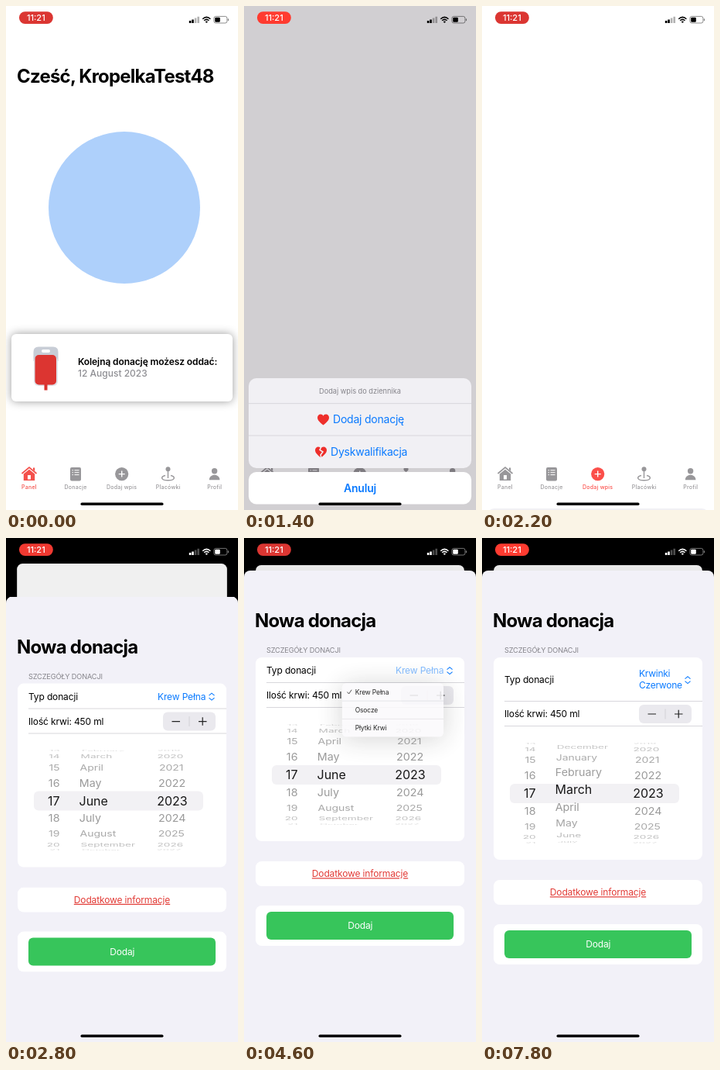
Animation, 300 px wide and 650 px high, one loop 8 s. Source, as an HTML page:

```html
<!DOCTYPE html>
<html lang="pl">
<head>
<meta charset="utf-8">
<title>Nowa donacja</title>
<style>
  html, body { margin: 0; width: 100%; height: 100%; overflow: hidden; background: #000; }
  svg { display: block; width: 100%; height: 100%; font: 12px Inter, "Open Sans", sans-serif; }
  .title { font-size: 24px; font-weight: 700; letter-spacing: -.8px; }
  .body { letter-spacing: -.14px; }
  .mid { text-anchor: middle; }
  .blue { fill: #0a7aff; }
  .action { font-size: 14px; letter-spacing: -.22px; }
  .caption { font-size: 9.2px; fill: #86858b; }
  .line { stroke: #d4d3d8; stroke-width: .9; }
  .tab { color: #98979a; fill: currentColor; }
  .tab text { font-size: 7px; font-weight: 500; letter-spacing: .25px; text-anchor: middle; }

  .pill, .bar, .home, .corners, .app, .shade, .sheet, .dim, .modal, .menu, .menu-box, .third, .last,
  .late, .group, .first-row, .one-line, .two-line, .panel-tab, .plus-tab {
    animation: 8s linear infinite;
  }
  .home, .corners, .panel-tab, .plus-tab, .bar, .late, .first-row, .group, .one-line, .two-line {
    animation-timing-function: step-end;
  }
  .pill { animation: pulse 2.2s ease-in-out infinite; }
  .home { animation-name: home; }
  .corners { animation-name: corners; }
  .panel-tab { animation-name: panel-tab; }
  .plus-tab { animation-name: plus-tab; }
  .bar { animation-name: bar; }
  .dim { animation-name: dim; }
  .sheet { animation-name: sheet; }
  .app { animation-name: app; }
  .shade { animation-name: shade; }
  .modal { animation-name: modal; }
  .menu { animation-name: menu; }
  .menu-box { animation-name: menu-box; }
  .third { animation-name: third; }
  .last { animation-name: last; }
  .late { animation-name: late; }
  .first-row { animation-name: first-row; }
  .group { animation-name: group; }
  .one-line { animation-name: one-line; }
  .two-line { animation-name: two-line; }

  @keyframes pulse { 0%, 10%, 84%, 100% { fill: #db3632; } 42%, 66% { fill: #ff3b30; } }
  @keyframes home { 0% { opacity: 1; } 17.5%, 100% { opacity: 0; } }
  @keyframes corners { 0% { opacity: 1; } 32.5%, 100% { opacity: 0; } }
  @keyframes panel-tab { 0% { color: #f4504b; } 17.5%, 100% { color: #98979a; } }
  @keyframes plus-tab { 0% { color: #98979a; } 25%, 100% { color: #fb4f4a; } }
  @keyframes bar { 0% { color: #000; } 35%, 100% { color: #fff; } }
  @keyframes dim {
    0%, 17.49% { opacity: 0; }
    17.5%, 22.5% { opacity: 1; }
    25% { opacity: .4; }
    27.5%, 100% { opacity: 0; }
  }
  @keyframes sheet {
    0%, 17.49% { transform: translateY(180px); }
    17.5%, 22.5% { transform: none; }
    25% { transform: translateY(96px); }
    27.5% { transform: translateY(168px); }
    30%, 100% { transform: translateY(180px); }
  }
  @keyframes app {
    0%, 30% { transform: none; animation-timing-function: cubic-bezier(.3, .7, .2, 1); }
    39%, 100% { transform: translate(15px, 35px) scale(.9); }
  }
  @keyframes shade { 0%, 30% { opacity: 0; } 37.5%, 100% { opacity: .09; } }
  @keyframes modal {
    0%, 30% { transform: translateY(612px); animation-timing-function: cubic-bezier(.3, .7, .2, 1); }
    39%, 100% { transform: none; }
  }
  @keyframes menu {
    0%, 55% { transform: scale(.2); opacity: 0; }
    57.5% { transform: scale(.7); opacity: .86; }
    60% { transform: scale(.97); opacity: 1; }
    62.5%, 75% { transform: none; opacity: 1; }
    77.5% { transform: translateY(4px) scale(.37); opacity: .13; }
    80%, 100% { transform: scale(.2); opacity: 0; }
  }
  @keyframes menu-box { 0%, 57.5% { height: 99px; } 60%, 75% { height: 132px; } 77.5%, 100% { height: 60px; } }
  @keyframes third { 0%, 75% { opacity: 1; } 77.5%, 100% { opacity: 0; } }
  @keyframes last { 0%, 57.5% { opacity: 0; } 60%, 75% { opacity: 1; } 77.5%, 100% { opacity: 0; } }
  @keyframes late { 0% { transform: none; } 77.5%, 100% { transform: translateY(24px); } }
  @keyframes first-row { 0% { transform: none; } 77.5%, 100% { transform: translateY(12px); } }
  @keyframes group { 0% { height: 237px; } 77.5%, 100% { height: 261px; } }
  @keyframes one-line { 0% { opacity: 1; } 57.5% { opacity: .5; } 77.5%, 100% { opacity: 0; } }
  @keyframes two-line { 0% { opacity: 0; } 77.5%, 100% { opacity: 1; } }
</style>
</head>
<body>
<svg viewBox="0 0 300 650">
  <defs>
    <path id="heart" d="M7.5 14C3 10.5 0 7.8 0 4.3C0 1.6 2 0 4 0C5.6 0 6.9.9 7.5 2.2C8.1.9 9.4 0 11 0C13 0 15 1.6 15 4.3C15 7.8 12 10.5 7.5 14Z" fill="#ee2f2b"/>
  </defs>
  <rect width="300" height="650"/>

  <g class="app">
    <rect width="300" height="660" rx="8" fill="#fff"/>
    <rect class="corners" width="300" height="20" fill="#fff"/>
    <g class="home">
      <text x="14" y="99" class="title">Cześć, KropelkaTest48</text>
      <circle cx="153" cy="260" r="98" fill="#aed0fb"/>
      <rect x="7" y="423" width="286" height="87" rx="6" fill="#fff" style="filter: drop-shadow(0 0 6px #0006)"/>
      <path d="M35.5 458V446Q35.5 439.5 42 439.5H61Q67.5 439.5 67.5 446V458Z" fill="#c8cdd6"/>
      <rect x="46" y="443" width="11" height="4" rx="2" fill="#fff"/>
      <rect x="36" y="452" width="31" height="38" rx="6" fill="#dfe2e8"/>
      <rect x="49.5" y="486" width="4" height="9.5" fill="#d8332f"/>
      <rect x="37.5" y="450" width="27.5" height="38.5" rx="5" fill="#dc3531"/>
      <text x="93" y="463" font-weight="600" letter-spacing="-.1">Kolejną donację możesz oddać:</text>
      <text x="93" y="478" font-weight="500" fill="#8e8e93">12 August 2023</text>
    </g>

    <g class="tab panel-tab">
      <path d="M20.5 603L30 595.2L39.5 603" fill="none" stroke="currentColor" stroke-width="1.7"/>
      <path d="M22.8 603.5L30 597.8L37.2 603.5V612H22.8ZM35 595.5h2.2v4.5l-2.2-2Z"/>
      <rect x="28" y="605" width="4" height="5.5" fill="#fff"/>
      <text x="30" y="622.5">Panel</text>
    </g>
    <g class="tab">
      <rect x="83" y="595" width="14" height="17.5" rx="2"/>
      <path d="M88.5 598.8H94.5M88.5 601.7H94.5M88.5 604.6H94.5M85.5 598.8h1.5M85.5 601.7h1.5M85.5 604.6h1.5" stroke="#fff"/>
      <text x="90" y="622.5">Donacje</text>
    </g>
    <g class="tab plus-tab">
      <circle cx="149.7" cy="603.6" r="8.6"/>
      <path d="M145.7 603.6h8M149.7 599.6v8" stroke="#fff" stroke-width="1.4"/>
      <text x="149.7" y="622.5">Dodaj wpis</text>
    </g>
    <g class="tab">
      <circle cx="209.5" cy="597.3" r="3"/>
      <path d="M209.5 599V609M206 605.5C199 607 200.5 611.8 209.5 611.8S220 607 213 605.5" fill="none" stroke="currentColor" stroke-width="1.4"/>
      <text x="209.7" y="622.5">Placówki</text>
    </g>
    <g class="tab">
      <circle cx="269.6" cy="599.8" r="3.7"/>
      <path d="M262.8 611.3C262.8 602.6 276.4 602.6 276.4 611.3Z"/>
      <text x="269.7" y="622.5">Profil</text>
    </g>
    <rect class="shade" width="300" height="660" rx="8"/>
  </g>

  <rect class="dim" width="300" height="650" fill="#0b0010" fill-opacity=".19"/>
  <g class="sheet">
    <rect x="6" y="480" width="288" height="116" rx="10" fill="#f1f0f4"/>
    <path class="line" d="M6 512.7H294M6 554H294"/>
    <text x="150" y="499.6" class="caption mid">Dodaj wpis do dziennika</text>
    <use href="#heart" x="95" y="526.5"/>
    <text x="115" y="538" class="action blue">Dodaj donację</text>
    <use href="#heart" x="92" y="568.5"/>
    <path d="M100 568L98 572.5L102 575L99 579L100 583" fill="none" stroke="#f1f0f4" stroke-width="1.5"/>
    <text x="112" y="580" class="action blue">Dyskwalifikacja</text>
    <rect x="6" y="601" width="288" height="41.5" rx="10" fill="#fff"/>
    <text x="150" y="627" class="action blue mid" font-weight="600">Anuluj</text>
  </g>

  <g class="modal body">
    <rect y="42" width="300" height="640" rx="8" fill="#f2f1f8"/>
    <text x="14" y="115" class="title">Nowa donacja</text>
    <text x="29" y="148.3" class="caption">SZCZEGÓŁY DONACJI</text>
    <rect class="group" x="15" y="154" width="270" height="237" rx="8" fill="#fff"/>
    <g class="first-row">
      <text x="29" y="175.3">Typ donacji</text>
      <path d="M262.5 169.6L266 166.6L269.5 169.6M262.5 172.6L266 175.6L269.5 172.6" fill="none" stroke="#0a7aff" stroke-width="1.1"/>
    </g>
    <text x="196" y="175.3" class="blue one-line">Krew Pełna</text>
    <g class="blue two-line" letter-spacing="-.25">
      <text x="203" y="179.4">Krwinki</text>
      <text x="203" y="194.2">Czerwone</text>
    </g>
    <g class="late">
      <path class="line" d="M29 186.5H285M29 218.5H285"/>
      <text x="29" y="207.3">Ilość krwi: 450 ml</text>
      <rect x="203" y="191" width="68" height="24" rx="6" fill="#eae9ee"/>
      <path d="M237 196.5V209.5" stroke="#d2d1d6"/>
      <path d="M214.5 203H225M249 203H259.5M254.2 197.8V208.2" stroke="#222" stroke-width="1.2"/>
      <rect x="36" y="293" width="219" height="25" rx="6" fill="#f2f1f4"/>
      <g id="wheel" transform="translate(0 305.2)" letter-spacing="0"></g>
      <rect x="15" y="417" width="270" height="32" rx="8" fill="#fff"/>
      <text x="150" y="437.3" class="mid" fill="#e23b36" text-decoration="underline">Dodatkowe informacje</text>
      <rect x="15" y="474" width="270" height="52" rx="8" fill="#fff"/>
      <rect x="29" y="482" width="242" height="36" rx="6" fill="#37c55b"/>
      <text x="150.3" y="504.3" class="mid" fill="#fff">Dodaj</text>
    </g>
    <g transform="translate(258 187)">
      <g class="menu">
        <rect class="menu-box" x="-187" width="187" height="132" rx="8" fill="#fbfafc" style="filter: drop-shadow(0 4px 24px #0003)"/>
        <path class="line" d="M-187 33H0"/>
        <path d="M-177.5 16.5L-174.5 20L-169.5 12.5" fill="none" stroke="#222" stroke-width="1.3"/>
        <text x="-163" y="21">Krew Pełna</text>
        <text x="-163" y="54">Osocze</text>
        <g class="third">
          <path class="line" d="M-187 66H0"/>
          <text x="-163" y="87">Płytki Krwi</text>
        </g>
        <g class="last">
          <path class="line" d="M-187 99H0"/>
          <text x="-163" y="120">Krwinki Czerwone</text>
        </g>
      </g>
    </g>
  </g>

  <g class="bar" fill="currentColor">
    <rect class="pill" x="17" y="7.3" width="43.8" height="15.7" rx="7.5"/>
    <text x="38.8" y="19.2" class="mid" font-size="11" font-weight="500" fill="#fff">11:21</text>
    <path d="M236.8 19h2.6v3h-2.6ZM240.2 17.4h2.6V22h-2.6Z"/>
    <path d="M243.8 15.6h2.6V22h-2.6ZM247.4 13.8H250V22h-2.6Z" opacity=".3"/>
    <path d="M254.2 16.8Q259.3 12 264.4 16.8M256.1 18.8Q259.3 16 262.5 18.8" fill="none" stroke="currentColor" stroke-width="1.5"/>
    <path d="M257.6 20.2Q259.3 18.9 261 20.2L259.3 22Z"/>
    <rect x="268.9" y="13.4" width="17" height="8.6" rx="2.4" fill="none" stroke="currentColor" stroke-width=".9" opacity=".5"/>
    <rect x="270.2" y="14.7" width="6.6" height="6" rx="1.2"/>
    <rect x="286.8" y="16.2" width="1.2" height="3" rx=".6" opacity=".5"/>
  </g>
  <rect x="96.5" y="640.6" width="107" height="3.4" rx="1.7"/>
</svg>

<script>
  const LOOP = 8000, STEP = 200, RADIUS = 64.5, ROW_ANGLE = .36;
  const MONTHS = "January February March April May June July August September October November December".split(" ");
  const wheel = document.getElementById("wheel");

  const columns = [
    { anchor: "end", x: 69.5, drift: 0, label: n => n },
    { anchor: "start", x: 94.5, drift: 4, label: n => MONTHS[(n + 12) % 12] },
    { anchor: "middle", x: 215, drift: -5, label: n => n }
  ];
  for (const column of columns) {
    column.cells = Array.from({ length: 9 }, () => {
      const cell = document.createElementNS(wheel.namespaceURI, "text");
      cell.setAttribute("text-anchor", column.anchor);
      return wheel.appendChild(cell);
    });
  }

  function turn({ cells, x, drift, label }, position) {
    const nearest = Math.round(position);
    cells.forEach((cell, i) => {
      const value = nearest + i - 4;
      const angle = (value - position) * ROW_ANGLE;
      const depth = Math.cos(angle);
      const selected = value === nearest;
      const size = selected ? 16 : 12.9 + 1.5 * depth;
      cell.textContent = label(value);
      cell.setAttribute("font-size", size);
      cell.setAttribute("y", size * .36);
      cell.setAttribute("opacity", Math.abs(angle) > 1.5 ? 0 : selected ? .9 : .1 + .32 * depth);
      cell.setAttribute("transform",
        `translate(${x + drift * (1 - depth)} ${RADIUS * Math.sin(angle)}) scale(1 ${Math.max(depth, 0)})`);
    });
  }

  // The month is dragged from June to just past March.
  function monthAt(t) {
    const p = Math.min(1, Math.max(0, (t - 6800) / 1000));
    return 5 - 2.8 * p * p * (3 - 2 * p);
  }

  const animations = document.getAnimations();
  animations.forEach(a => a.pause());

  function draw(t) {
    animations.forEach(a => { a.currentTime = t + 1; });
    [17, monthAt(t), 2023].forEach((position, i) => turn(columns[i], position));
  }

  const start = performance.now();
  function tick() {
    const elapsed = (performance.now() - start) % LOOP;
    draw(Math.floor(elapsed / STEP) * STEP);
    requestAnimationFrame(tick);
  }
  tick();
</script>
</body>
</html>
```
